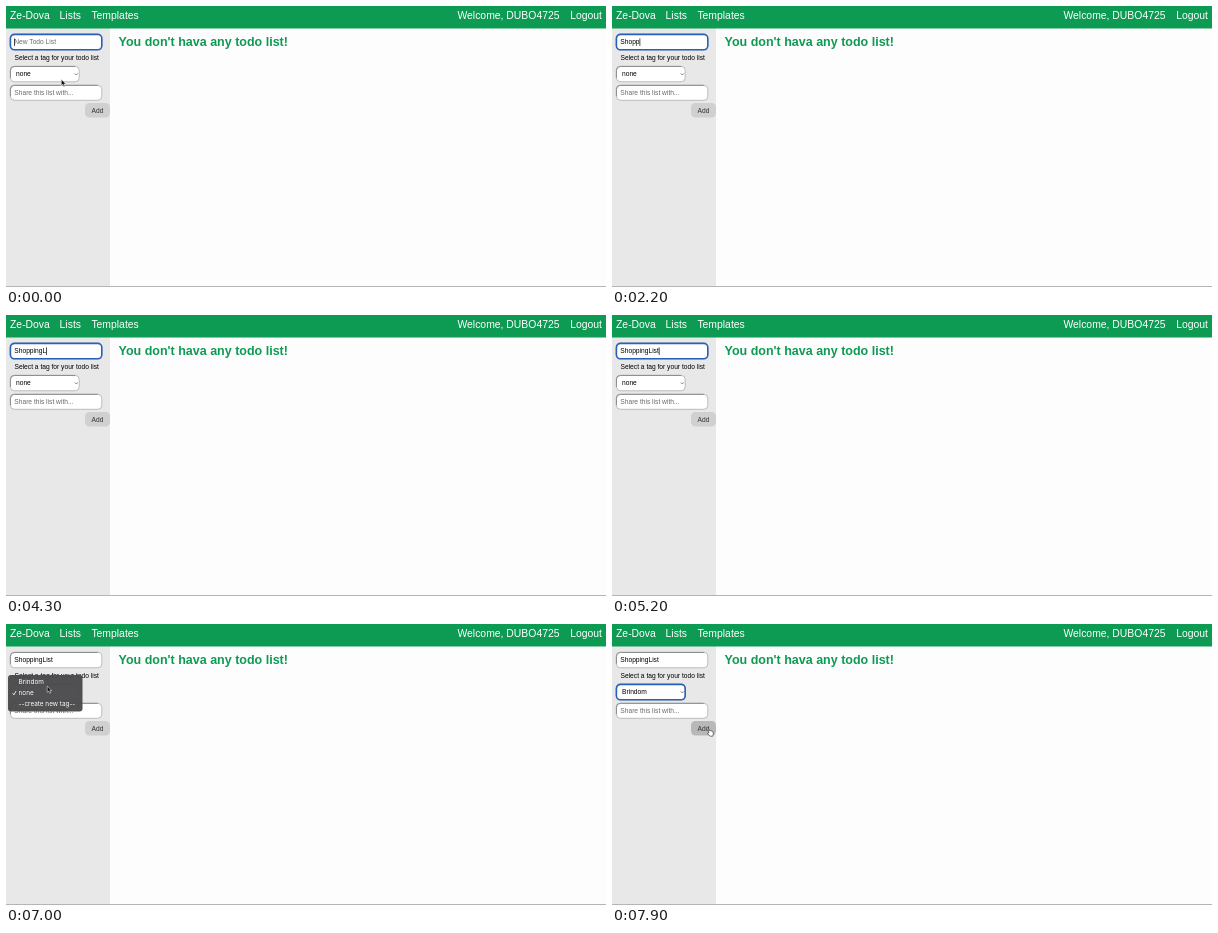
Animation, 600 px wide and 281 px high, one loop 8000 ms. Source, as an HTML page:

```html
<!DOCTYPE html>
<html lang="en">
<head>
<meta charset="utf-8">
<title>Todo list</title>
<style>
  html, body { margin: 0; width: 100%; height: 100%; overflow: hidden; background: #fdfdfd; }
  svg { display: block; width: 600px; height: 281px; font: 6.67px "Liberation Sans", Arial, sans-serif; }
  .nav { font-size: 10.4px; fill: #fff; }
  .title { font-size: 12.5px; font-weight: bold; fill: #0d9a53; }
  .hint { fill: #6b6b6b; }
  .field { fill: #fff; stroke: #bcbcbc; }
  .shade { fill: none; stroke: #8a8a8a; }
  .ring { fill: none; stroke: #2862b8; stroke-width: 1.6; }
  .menu text { font: 6.4px Inter, sans-serif; fill: #fff; }
</style>
</head>
<body>
<svg viewBox="0 0 600 281">
  <rect width="600" height="281" fill="#fdfdfd"/>
  <rect y="22" width="104" height="259" fill="#e8e8e8"/>
  <rect width="600" height="22.5" fill="#0d9a53"/>
  <rect y="280" width="600" height="1" fill="#b4b4b4"/>
  <g class="nav">
    <text x="4" y="13.3">Ze-Dova</text>
    <text x="53.6" y="13.3">Lists</text>
    <text x="85.4" y="13.3">Templates</text>
    <text x="553.5" y="13.3" text-anchor="end">Welcome, DUBO4725</text>
    <text x="596" y="13.3" text-anchor="end">Logout</text>
  </g>
  <text class="title" x="112.5" y="39.7">You don't hava any todo list!</text>

  <g id="fields"></g>
  <text id="typed" x="8.3" y="38.3"></text>
  <text id="hint" class="hint" x="8.3" y="38.3">New Todo List</text>
  <rect id="caret" y="32.4" width="0.7" height="7.6"/>
  <text x="8.5" y="54.3">Select a tag for your todo list</text>
  <text id="tag" x="10" y="70.4"></text>
  <path d="M68.8 67.4l1.5 1.6 1.5-1.6" fill="none" stroke="#555" stroke-width="0.7"/>
  <text class="hint" x="8.3" y="88.8">Share this list with...</text>
  <rect id="button" x="79" y="97" width="25" height="14.6" rx="4.5"/>
  <text x="85.6" y="106.6" fill="#333">Add</text>

  <g id="menu" class="menu">
    <rect x="2" y="51" width="74.5" height="36.6" rx="3" fill="#4a4a4c" fill-opacity="0.96"/>
    <rect id="highlight" x="4.6" width="69.6" height="10.8" rx="1.8" fill="#3a75e0"/>
    <text x="12.6" y="60.4">Brindom</text>
    <text x="12.6" y="71.3">none</text>
    <text x="12.6" y="82.1">--create new tag--</text>
    <path d="M6.6 69.2l1.3 1.7 2.3-4" fill="none" stroke="#fff" stroke-width="0.8"/>
  </g>

  <path id="arrow" d="M0 0V6.3L1.5 5 2.5 7.4 3.6 6.9 2.6 4.6H4.6Z" fill="#111" stroke="#fff" stroke-width="0.5"/>
  <path id="hand" d="M0 .6Q.7-.2 1.2.6L2 2.4Q2.8 1.8 3.3 2.4 4 2 4.4 2.8 5.1 2.6 5.2 3.5L5.3 5.6 4.7 7.6H2L-.5 5Q-.5 4.1.5 4.3L1 4.4Z" fill="#fff" stroke="#222" stroke-width="0.6"/>
</svg>
<script>
const $ = id => document.getElementById(id);
const LOOP = 8000, TICK = 100;

const boxes = { name: [4.4, 28.4, 91.4, 15.4], tag: [4.4, 60.4, 68.8, 15.4], share: [4.4, 79.3, 91.4, 15] };
$('fields').innerHTML = Object.entries(boxes).map(([id, [x, y, w, h]]) => {
  const box = `x="${x}" y="${y}" width="${w}" height="${h}" rx="4"`;
  return `<rect class="field" ${box}/>
    <path class="shade" d="M${x} ${y + h - 4}V${y + 4}q0-4 4-4H${x + w - 4}"/>
    <rect class="ring" id="ring-${id}" ${box}/>`;
}).join('');

// Each step is [start in ms, value]
const typing = [[0, 0], [1000, 1], [1200, 2], [1400, 3], [1700, 4], [2100, 5], [2500, 6], [2600, 7],
  [2700, 8], [4300, 9], [4600, 10], [4700, 11], [4900, 12]];
const caretOn = [[0, true], [400, false], [900, true], [3400, false], [3900, true], [5700, false]];
const focus = [[0, 'name'], [5900, ''], [7200, 'tag']];
const menuRow = [[0, null], [5900, 1], [6700, 0], [7000, -1], [7100, 0], [7200, null]];
const pointer = [[0, 'arrow'], [200, ''], [5300, 'arrow'], [7900, 'hand']];
const path = [[0, 55.3, 73.3], [5300, 55.3, 84], [5700, 41.3, 72.6], [6500, 41.3, 72.6],
  [6800, 41.2, 62], [7200, 41.2, 62], [7800, 96, 104.6], [7900, 96, 104.6]];

const at = (steps, t) => steps.findLast(([start]) => start <= t)[1];
const show = (id, on) => $(id).setAttribute('visibility', on ? 'visible' : 'hidden');

function position(t) {
  const i = path.findLastIndex(([start]) => start <= t);
  const [t0, x0, y0] = path[i], [t1, x1, y1] = path[i + 1] || [LOOP, x0, y0];
  const p = (t - t0) / (t1 - t0), ease = p * p * (3 - 2 * p);
  return [x0 + (x1 - x0) * ease, y0 + (y1 - y0) * ease];
}

function draw(t) {
  const text = 'ShoppingList'.slice(0, at(typing, t));
  $('typed').textContent = text;
  show('hint', !text);
  show('caret', at(caretOn, t));
  $('caret').setAttribute('x', 8.3 + (text ? $('typed').getComputedTextLength() : 0));

  for (const id in boxes) show('ring-' + id, at(focus, t) === id);
  $('tag').textContent = t < 7200 ? 'none' : 'Brindom';

  const row = at(menuRow, t);
  $('menu').style.display = row === null ? 'none' : '';
  $('highlight').style.display = row >= 0 ? '' : 'none';
  $('highlight').setAttribute('y', 52.8 + 10.9 * (row || 0));

  const shape = at(pointer, t);
  for (const id of ['arrow', 'hand']) {
    show(id, shape === id);
    $(id).setAttribute('transform', `translate(${position(t)})`);
  }
  $('button').setAttribute('fill', shape === 'hand' ? '#b8b8b8' : '#d0d0d0');
}

const begin = performance.now();
function frame() {
  const t = (performance.now() - begin) % LOOP;
  draw(Math.floor(t / TICK) * TICK);
  requestAnimationFrame(frame);
}
frame();
</script>
</body>
</html>
```
